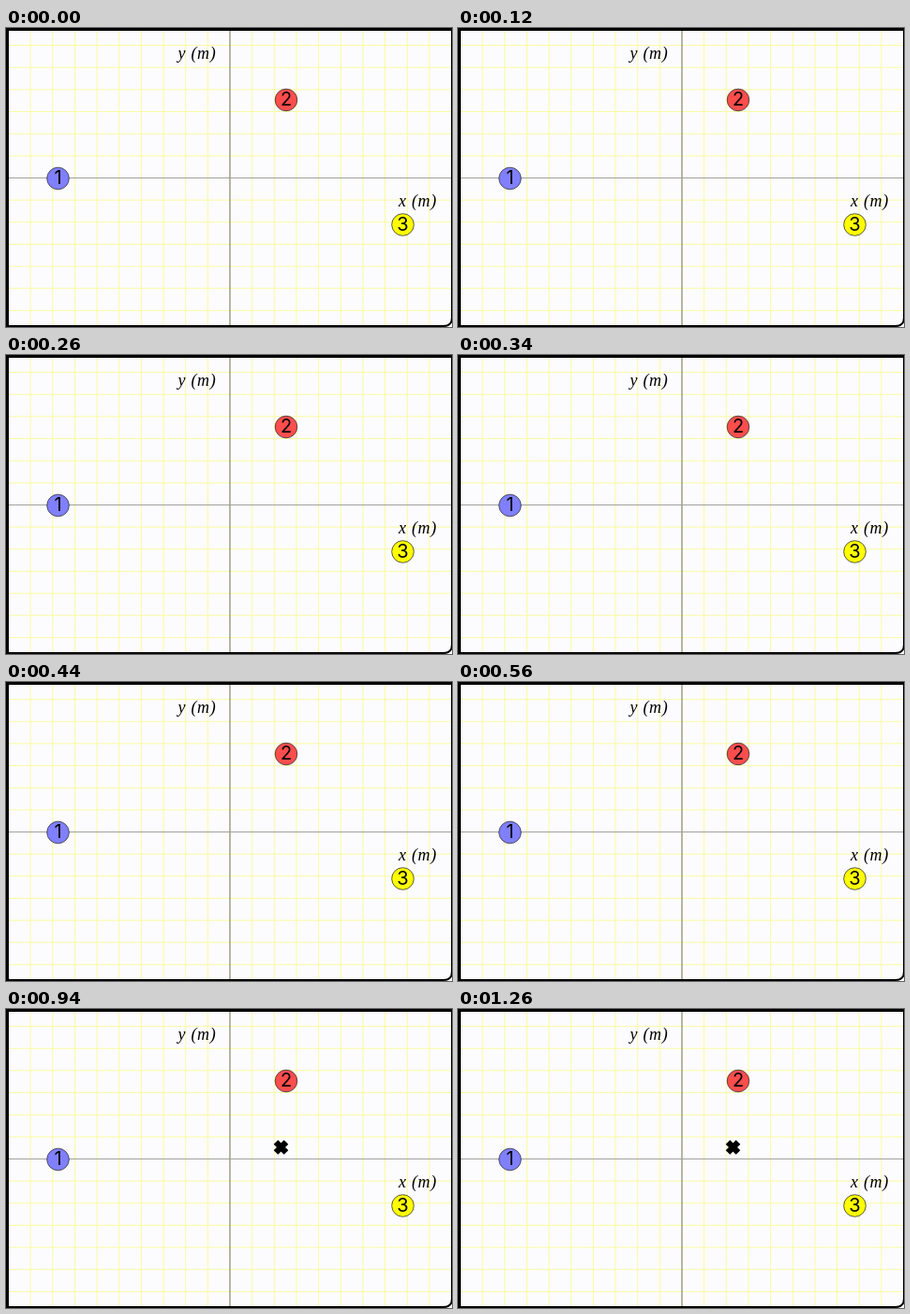
Recreate the animation shown at these times as an HTML page. Size 476 px wide and 320 px high, loop 1.28 s.

```html
<!DOCTYPE html>
<html lang="en">
<head>
<meta charset="utf-8">
<title>Centre of mass</title>
<style>
  html, body { margin: 0; width: 100%; height: 100%; overflow: hidden; background: #fcfcff; }
  svg { display: block; }
  .label { font: italic 18px "Liberation Serif", serif; letter-spacing: .7px; }
  .ball circle { stroke: #333; stroke-width: .8; }
  .ball text { font: 20px Inter, sans-serif; text-anchor: middle; }
</style>
</head>
<body>
<svg width="476" height="320" viewBox="0 0 476 320">
  <g id="grid"></g>
  <path d="M0 0H476V3H3V320H0Z"/>
  <path d="M0 319H467Q476 319 476 310V0" fill="none" stroke="#000" stroke-width="2"/>
  <text class="label" x="183.5" y="33">y (m)</text>
  <text class="label" x="419" y="191">x (m)</text>
  <g id="balls"></g>
  <path id="cross" transform="translate(293.5 148)" d="M-5.5 -5.5L5.5 5.5M5.5 -5.5L-5.5 5.5" stroke="#000" stroke-width="6.5"/>
</svg>
<script>
const LOOP = 1280, CROSS_AT = 640, STEP = 23.65;
const CENTER = { x: 239, y: 160.5 };
const $ = id => document.getElementById(id);

const line = (d, color, width) => `<path d="${d}" stroke="${color}" stroke-width="${width}"/>`;
const vLine = (i, color, width) => line(`M${CENTER.x + i * STEP} 3V318`, color, width);
const hLine = (i, color, width) => line(`M3 ${CENTER.y + i * STEP}H475`, color, width);

let lines = "";
for (let i = -9; i <= 9; i++) lines += vLine(i, "#fafaa0", 1);
for (let i = -6; i <= 6; i++) lines += hLine(i, "#fafaa0", 1);
$("grid").innerHTML = lines + vLine(0, "#888884", 1.2) + hLine(0, "#a0a09a", 1);

const balls = [[55.5, 161, "#8080ff"], [299, 77, "#ff4d4d"], [423.5, 210.5, "#ffff00"]];
$("balls").innerHTML = balls.map(([x, y, color], i) =>
  `<g class="ball"><circle cx="${x}" cy="${y}" r="11.8" fill="${color}"/>` +
  `<text x="${x}" y="${y + 6}">${i + 1}</text></g>`).join("");

function draw() {
  const shown = performance.now() % LOOP >= CROSS_AT;
  $("cross").setAttribute("visibility", shown ? "visible" : "hidden");
  requestAnimationFrame(draw);
}
draw();
</script>
</body>
</html>
```
